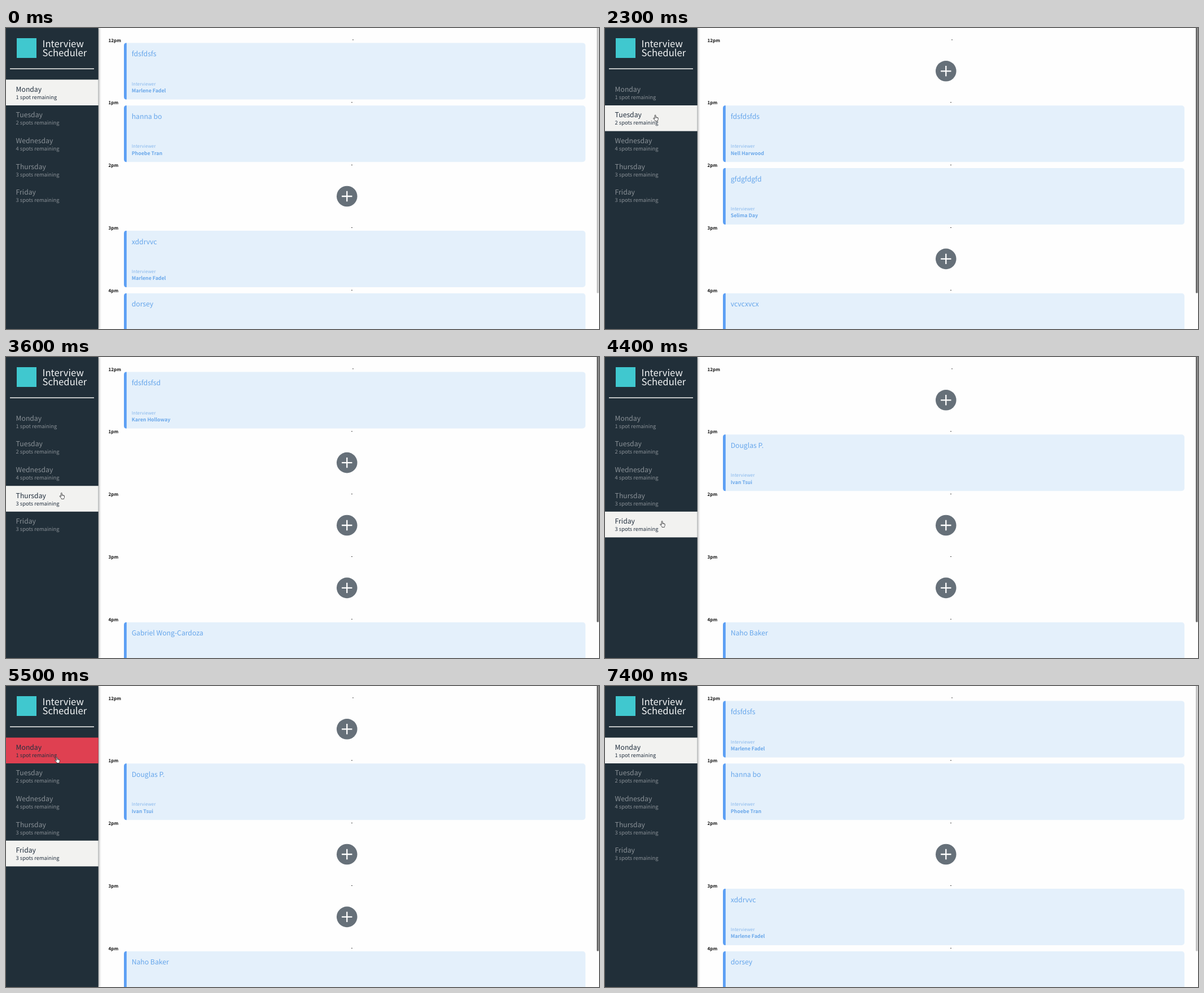
Recreate the animation shown at these times as an HTML page. Size 1051 px wide and 533 px high, loop 7.5 s.

```html
<!DOCTYPE html>
<html lang="en">
<head>
<meta charset="utf-8">
<title>Interview Scheduler</title>
<style>
  html, body { margin: 0; width: 100%; height: 100%; overflow: hidden; background: #fefefe; }
  svg { display: block; width: 1051px; height: 533px; text-rendering: geometricPrecision;
    font-family: "Noto Sans CJK JP", "Noto Sans CJK SC", "Noto Sans CJK", "Noto Sans", sans-serif; }
  .title { font-size: 12.2px; }
  .sub { font-size: 9.3px; font-weight: 300; }
  .hour { font-size: 8px; font-weight: 700; fill: #111; }
  .label { font-size: 8px; font-weight: 300; fill: #87b7ec; }
  .person { font-size: 8.8px; font-weight: 700; fill: #6ba8ea; }
  .logo { font-size: 16.7px; font-weight: 300; fill: #f2f4f5; }
  .student { fill: #66a6eb; }
</style>
</head>
<body>
<svg viewBox="0 0 1051 533">
  <g id="main"></g>
  <rect id="bar" x="1047" y="-4" width="3.6" height="473.6" rx="1.5"/>
  <rect width="163.7" height="533" fill="#212f39" style="filter:drop-shadow(1px 0 2px rgba(0,0,0,.4))"/>
  <rect x="19" y="18" width="35" height="35" fill="#40c8cf"/>
  <text class="logo" x="64.5" y="34">Interview</text>
  <text class="logo" x="64.5" y="50.4">Scheduler</text>
  <path d="M7 72.2H156" stroke="#f2f2f0" stroke-width="1.4"/>
  <g id="days"></g>
  <g id="cursor" stroke="#222" stroke-width=".8" stroke-linejoin="round" fill="#fff"></g>
</svg>
<script>
const LOOP = 7500, STEP = 100, ROW = 110.85, ITEM = 45.6, TOP = 91.4;
const $ = id => document.getElementById(id);
const text = (cls, x, y, s, fill) =>
  `<text class="${cls}" x="${x}" y="${y}"${fill ? ` fill="${fill}"` : ''}>${s}</text>`;

// Each day: name, then five hourly slots of [student, interviewer] or 0 when free
const days = [
  ['Monday', ['fdsfdsfs', 'Marlene Fadel'], ['hanna bo', 'Phoebe Tran'], 0, ['xddrvvc', 'Marlene Fadel'], ['dorsey', '']],
  ['Tuesday', 0, ['fdsfdsfds', 'Nell Harwood'], ['gfdgfdgfd', 'Selima Day'], 0, ['vcvcxvcx', '']],
  ['Wednesday', 0, ['gfdgfds', 'Phoebe Tran'], 0, 0, 0],
  ['Thursday', ['fdsfdsfsd', 'Karen Holloway'], 0, 0, 0, ['Gabriel Wong-Cardoza', '']],
  ['Friday', 0, ['Douglas P.', 'Ivan Tsui'], 0, 0, ['Naho Baker', '']]
];
const clicks = [[0, 0], [2200, 1], [2900, 2], [3600, 3], [4400, 4], [6100, 0]];

// Pointer stops: time, left, top
const path = [
  [1000, 126, 23], [1400, 77, 110.5], [1900, 77, 110.5], [2300, 85, 153.5], [2400, 85, 153.5],
  [2700, 93, 191], [3100, 93, 191], [3400, 94.3, 240], [3700, 94.3, 240], [4200, 97, 290],
  [4700, 97, 290], [5000, 94.3, 245], [5300, 91, 160], [5400, 91, 160], [5500, 86, 125.2],
  [6300, 86, 125.2], [6700, 99, 41], [6900, 99, 41]
];
const arrow = '<path d="M.5 .5V10L2.7 8 4.2 11.4 5.8 10.7 4.3 7.4H7.4Z" fill="#111" stroke="#fff"/>';
const hand = '<path d="M3.2 7.3V1.6Q3.2.5 4.1.5T5 1.6V4.3Q6.4 3.7 6.6 4.8 7.9 4.3 8 5.3 9.2 5 9.2 6.2' +
  'V8.2Q9 9.5 8.3 10.3V11.4H4V10.4L1 7.1Q.3 6.1 1.2 5.8T3.2 7.3Z"/>' +
  '<path d="M5 4.3V6M6.6 4.8V6.2M8 5.3V6.4" fill="none" stroke-width=".6"/>';

function pointer(t) {
  if (t < path[0][0] || t >= 6900) return null;
  const i = path.findIndex(p => p[0] > t);
  const [t0, x0, y0] = path[i - 1], [t1, x1, y1] = path[i];
  const u = 1 - (1 - (t - t0) / (t1 - t0)) ** 2;
  return { x: x0 + (x1 - x0) * u, y: y0 + (y1 - y0) * u };
}

function slot(appt, i) {
  const y = 26.4 + ROW * i;
  const head = text('hour', 181.6, y - 1.9, (i || 12) + 'pm') +
    `<rect x="${i ? 612 : 614}" y="${y - 6}" width="2" height="1" fill="#444"/>`;
  if (!appt) return head +
    `<g transform="translate(604.3 ${y + 49.9})"><circle r="18.3" fill="#667079"/>` +
    '<path d="M-9.2 0H9.2M0-9.2V9.2" stroke="#fff" stroke-width="2.3"/></g>';
  return head + `<rect x="209" y="${y}" width="818" height="100" rx="5" fill="#e4f0fb"/>` +
    `<path d="M213.8 ${y}v100h-.8q-4 0-4-5v-90q0-5 4-5z" fill="#5c9ff4"/>` +
    text('title student', 222.7, y + 23.6, appt[0]) +
    text('label', 222.7, y + 75.1, 'Interviewer') +
    text('person', 222.7, y + 87.3, appt[1]);
}

function dayItem([name, ...slots], i, chosen, hover) {
  const y = TOP + ITEM * i, free = slots.filter(s => !s).length;
  const bg = i === chosen ? '#f2f2f0' : i === hover ? '#df4051' : 'none';
  const ink = bg === 'none' ? '#8a9197' : '#222f3e';
  return `<rect y="${y}" width="163.7" height="${ITEM}" fill="${bg}"/>` +
    text('title', 17.6, y + 21.3, name, ink) +
    text('sub', 17.6, y + 34.3, `${free} spot${free > 1 ? 's' : ''} remaining`, ink);
}

function draw(t) {
  const chosen = clicks.filter(c => c[0] <= t).pop()[1];
  const p = pointer(t);
  const hover = p ? Math.floor((p.y + 1 - TOP) / ITEM) : -1;
  $('main').innerHTML = days[chosen].slice(1).map(slot).join('');
  $('days').innerHTML = days.map((d, i) => dayItem(d, i, chosen, hover)).join('');
  $('bar').setAttribute('fill', t >= 1700 && t < 7400 ? '#6c6c6c' : '#c4c4c4');
  $('cursor').innerHTML = p ? `<g transform="translate(${p.x} ${p.y})">${hover < 0 ? arrow : hand}</g>` : '';
}

let last = -1;
function tick() {
  const t = Math.floor(performance.now() % LOOP / STEP) * STEP;
  if (t !== last) draw(last = t);
  requestAnimationFrame(tick);
}
tick();
</script>
</body>
</html>
```
